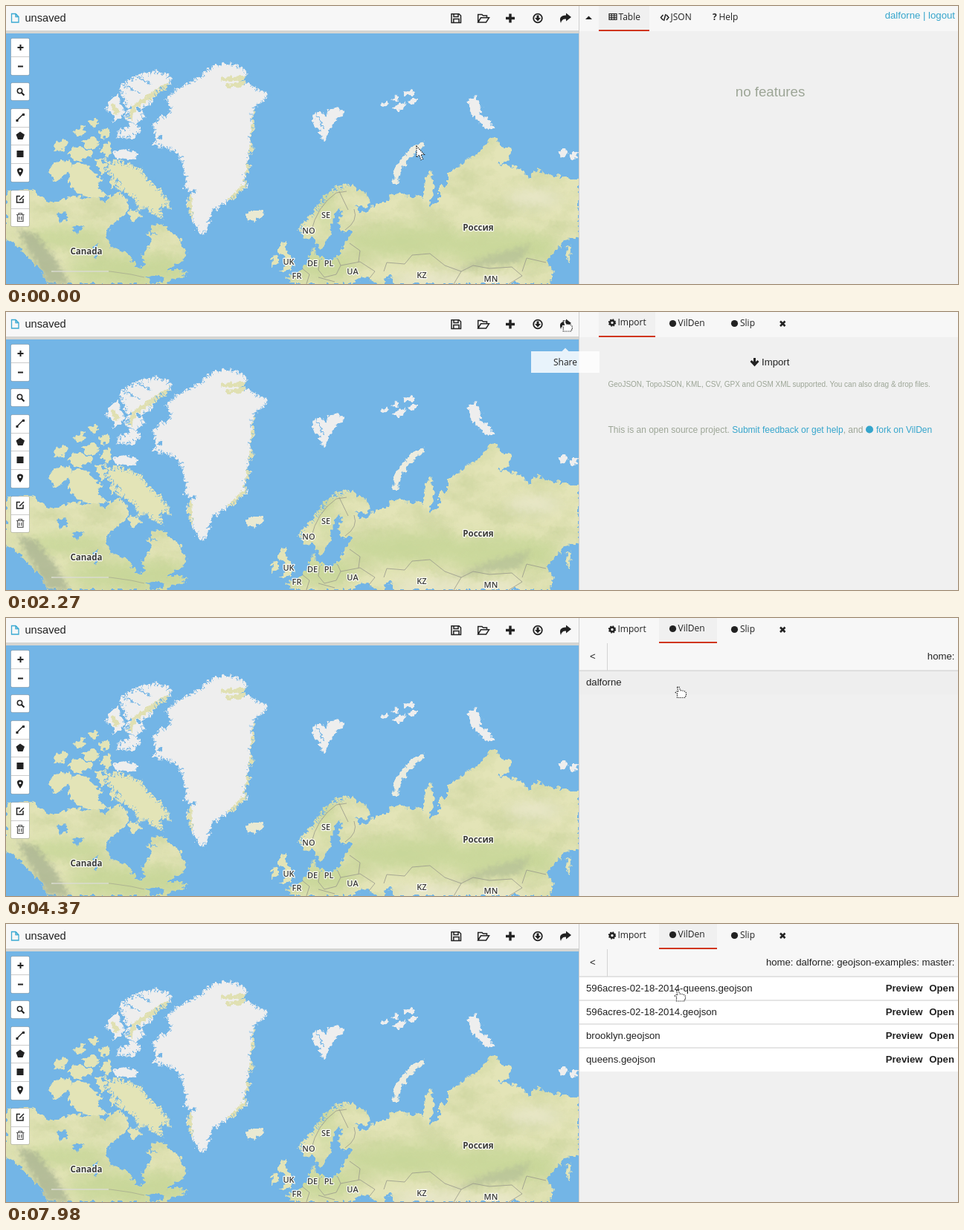
Animation, 1280 px wide and 375 px high, one loop 8000 ms. Source, as an HTML page:

```html
<!DOCTYPE html>
<html lang="en">
<head>
<meta charset="utf-8">
<title>Map editor</title>
<style>
html, body { margin: 0; width: 100%; height: 100%; overflow: hidden; background: #f0f0f0; }
svg { display: block; width: 100vw; height: 100vh; }
text { font: 13.2px "Liberation Sans", Arial, sans-serif; fill: #222; white-space: pre; }
.ui { font: 12px "Open Sans", "Noto Sans", sans-serif; }
.end { text-anchor: end; }
.mid { text-anchor: middle; }
.bold { font-weight: bold; }
.muted { fill: #9ca596; }
.link { fill: #35a5cc; }
.label { font: 600 11px "Open Sans", "Noto Sans", sans-serif; text-anchor: middle; fill: #3c3c38;
  stroke: #fffd; stroke-width: 2.5px; paint-order: stroke; stroke-linejoin: round; }
.big { font-size: 11.5px; font-weight: bold; }
.line { fill: none; stroke: #222; stroke-width: 1.5; }
.fjords { fill: none; stroke: #73b5e6; stroke-width: 9; stroke-dasharray: 1.3 5.2 1 3.6; }
.cursor path { fill: #fff; stroke: #222; stroke-width: 1.2; stroke-dasharray: 1.4 1.2; }
.tip path { fill: #fff; fill-opacity: .84; }
</style>
</head>
<body>
<svg viewBox="0 0 1280 375" preserveAspectRatio="none">
<defs>
  <filter id="coast" x="0" y="0" width="770" height="375" filterUnits="userSpaceOnUse" color-interpolation-filters="sRGB">
    <feTurbulence type="fractalNoise" baseFrequency=".17" numOctaves="2" seed="4"/>
    <feDisplacementMap in="SourceGraphic" scale="10" xChannelSelector="R" yChannelSelector="G"/>
  </filter>
  <filter id="relief" x="0" y="0" width="770" height="375" filterUnits="userSpaceOnUse" color-interpolation-filters="sRGB">
    <feTurbulence type="fractalNoise" baseFrequency=".02 .035" numOctaves="4" seed="9"/>
    <feColorMatrix values="0 0 0 0 .75  0 0 0 0 .8  0 0 0 0 .57  2 0 0 0 -.75"/>
  </filter>
  <filter id="soft" x="-30%" y="-30%" width="160%" height="160%"><feGaussianBlur stdDeviation="9"/></filter>
  <filter id="haze" x="-30%" y="-30%" width="160%" height="160%"><feGaussianBlur stdDeviation="3"/></filter>
  <clipPath id="map"><path d="M0 37H770V375H0Z"/></clipPath>
  <clipPath id="onLand"><use href="#america"/><use href="#eurasia"/></clipPath>
  <clipPath id="onIce"><use href="#greenland"/></clipPath>
  <path id="america" d="M-9 246L14 250 34 247 48 256 60 266 78 261 92 254 106 261 120 257 132 265 142 257 152 250 160 257 166 272 158 284 146 291 138 300 134 312 140 324 154 330 166 336 172 348 180 356 186 346 182 336 192 326 196 316 190 306 198 296 210 294 222 305 232 311 237 323 244 331 238 342 226 350 214 358 228 356 244 360 236 366 220 368 214 385H62L50 360 36 345 22 330 8 318-9 314Z"/>
  <path id="eurasia" d="M397 309L393 299 404 288 414 276 421 264 432 252 444 244 458 239 472 246 486 255 491 266 482 272 470 268 474 278 484 279 496 267 510 265 516 256 530 251 546 260 556 255 562 258 564 230 571 221 575 246 568 272 582 264 582 244 594 240 594 226 608 218 618 208 636 198 650 180 660 178 664 188 679 193 676 207 662 213 690 218 704 232 714 220 728 228 748 230 780 236V310L752 316 740 330 726 344 736 358 728 385H376L384 371 376 366 390 361 398 353 407 345 409 331 416 325 417 338 430 342 446 340 451 330 456 319 462 308 470 304 452 304 446 292 455 278 447 274 441 282 437 296 438 306 431 316 424 328 417 322 412 310 404 313Z"/>
  <path id="greenland" d="M197 160L206 150 216 146 222 134 214 126 230 110 246 103 262 94 276 82 296 76 318 82 327 92 318 100 340 112 353 118 346 130 336 134 331 150 335 165 328 180 334 192 324 206 330 216 320 232 326 243 308 258 290 268 279 278 273 292 269 308 259 305 250 290 245 276 242 262 251 250 239 246 242 232 236 216 233 200 214 192 196 186 204 178 198 170Z"/>
  <path id="ellesmere" d="M158 128L152 112 162 100 180 92 202 87 218 91 224 102 212 113 200 121 194 134 182 140 188 150 176 158 182 168 168 180 150 178 148 170 166 160 160 146 164 138Z"/>
  <path id="baffin" d="M134 212L150 208 166 212 182 220 192 234 206 246 218 262 221 276 208 271 212 288 198 282 188 272 178 278 174 262 160 252 148 248 152 236 138 226Z"/>
</defs>

<g clip-path="url(#map)">
  <path fill="#73b5e6" d="M0 37H770V375H0Z"/>
  <g filter="url(#coast)">
    <g fill="#e3e4b7">
      <use href="#america"/><use href="#eurasia"/><use href="#baffin"/>
      <path d="M57 224L66 210 82 208 90 214 80 228 66 238ZM84 220L98 211 112 215 118 226 130 234 122 244 137 256 118 260 98 254 86 242ZM120 208L136 205 140 222 128 228ZM140 228L148 226 150 244 142 248Z"/>
      <path d="M164 278L178 274 182 284 168 290ZM150 262L160 260 158 270ZM136 256L142 254 140 262Z"/>
      <path d="M64 188L76 178 84 184 78 194 68 196ZM90 170L104 163 108 171 98 175ZM82 200L92 190 104 192 118 198 108 205 96 208ZM102 182L118 176 126 186 116 194 106 190ZM112 156L122 152 124 160 116 164ZM126 192L138 184 143 198 134 204ZM124 168L138 166 140 176 128 178Z"/>
      <path d="M370 320L378 318 376 330 383 340 390 350 381 356 369 358 375 349 372 338 366 328ZM358 338L366 336 366 348 357 352ZM754 322L759 324 758 346 753 342Z"/>
      <path fill="#e9e9d2" d="M321 282L330 276 344 275 348 282 336 290 326 288Z"/>
    </g>
    <g clip-path="url(#onLand)">
      <rect width="770" height="375" filter="url(#relief)" opacity=".55"/>
      <g fill="#c6d697" filter="url(#soft)" opacity=".85">
        <ellipse cx="170" cy="355" rx="90" ry="22"/><ellipse cx="80" cy="312" rx="55" ry="14"/>
        <ellipse cx="540" cy="318" rx="85" ry="22"/><ellipse cx="665" cy="325" rx="80" ry="24"/>
        <ellipse cx="425" cy="350" rx="45" ry="20"/><ellipse cx="430" cy="275" rx="9" ry="30"/>
      </g>
      <g fill="#abb593" filter="url(#haze)">
        <path d="M14 300L40 308 66 340 86 375H56L36 340Z" opacity=".8"/>
        <path opacity=".5" d="M595 360L650 336 706 322 690 346 640 352Z"/>
      </g>
      <g fill="#e9e7cb" filter="url(#soft)"><ellipse cx="570" cy="372" rx="55" ry="12"/><ellipse cx="660" cy="374" rx="40" ry="10"/><ellipse cx="710" cy="260" rx="38" ry="10"/></g>
    </g>
    <path fill="#73b5e6" d="M68 280L80 277 84 287 74 290ZM88 300L106 295 104 300 92 306ZM116 326L122 322 124 338 118 340ZM188 366L206 362 214 370 198 374ZM468 370L486 366 496 376H464ZM508 366L518 364 522 376H510Z"/>
    <g fill="#eee">
      <use href="#greenland"/><use href="#ellesmere"/>
      <path d="M134 140L140 126 150 118 153 130 160 142 152 152 144 158 146 148ZM144 197L160 193 177 197 174 208 150 206Z"/>
      <path d="M412 147L424 143 430 150 436 139 452 138 454 146 444 152 440 160 434 166 428 186 423 172 414 160ZM621 128L632 122 640 134 636 146 646 150 657 164 648 168 634 156 626 146Z"/>
      <path d="M502 132L512 128 514 134 506 137ZM518 125L526 121 528 126 522 129ZM534 116L546 113 549 119 538 121ZM520 137L534 130 538 136 528 141ZM540 128L552 124 551 130 543 132ZM742 196L752 192 756 201 746 205ZM758 200L768 197 769 205 760 206Z"/>
      <path fill="none" stroke="#ececdf" stroke-width="8" d="M525 239Q522 224 534 210 544 194 561 186"/>
    </g>
    <g fill="none" stroke="#e0e0b2" stroke-width="6">
      <path d="M166 152L174 134 194 122 220 104M144 132L150 146"/>
      <g clip-path="url(#onIce)"><path d="M290 99L322 97 316 106 296 108M334 140L332 168 331 192 326 216 322 240 300 264M246 256L248 288"/></g>
    </g>
    <use class="fjords" href="#greenland" style="stroke-width:7"/><use class="fjords" href="#ellesmere"/><use class="fjords" href="#baffin"/>
    <path class="fjords" d="M398 306L396 296 414 276 432 252 458 239"/>
    <path fill="none" stroke="#73b5e6" stroke-width="1.5" d="M180 300L204 308M414 142L428 166M160 108L180 116M176 96L194 106"/>
  </g>
  <g fill="none" stroke="#99998c" stroke-width=".8">
    <path d="M410 305Q418 270 444 252L458 250M448 250L460 275M456 302Q474 290 468 274M446 341L450 350 444 362 428 366 420 356 422 342M398 354L408 362 404 375M450 350L476 345 496 358 488 368M462 320L476 330 474 345M420 366L442 372"/>
    <path d="M508 358L512 346 536 348 546 336 570 334 590 350 612 358 602 375M612 358L628 350 650 354 680 352 694 364 676 375M694 358L700 340 726 346"/>
    <path d="M64 358H140L168 362 186 366" opacity=".7"/>
  </g>
  <path fill="none" stroke="#eee" stroke-width="2" opacity=".5" d="M61 358H138"/>
  <g id="labels"></g>
</g>

<path fill="#f7f7f7" d="M0 0H770V33H0Z"/>
<path fill="#d5d5d2" d="M0 33H770V37H0Z"/>
<path class="line" style="stroke:#3aa9d2;stroke-width:1.3" d="M7.5 10.5H13L17 14.5V22H7.5ZM13 10.5V14.5H17"/>
<text x="25.5" y="21" style="font-size:14.6px">unsaved</text>
<g class="line">
  <path d="M599 10.7H609L611.5 13V22.5H599ZM602 11V14.5H608V11M601.8 22V17.5H609V22"/>
  <path d="M634.7 21.5V11.5H640L641.5 13H646.5V15.5M634.7 22L638.5 15.8H649.5L645.5 22Z"/>
  <path style="stroke-width:3.4" d="M672 16.5H684M678 10.5V22.5"/>
  <circle cx="715" cy="16.5" r="5.8" style="stroke-width:1.8"/>
</g>
<path fill="#222" d="M713.5 12.5H716.5V16H719L715 20.5 711 16H713.5ZM753 9.5L760 15 753 20.5V17.4Q747 17 746 23 742 13 753 12.6Z"/>

<g fill="#fff" stroke="#0003">
  <rect x="6.5" y="43.5" width="25" height="50" rx="2"/><rect x="6.5" y="103.5" width="25" height="24" rx="2"/>
  <rect x="6.5" y="138.5" width="25" height="99" rx="2"/><rect x="6.5" y="248.5" width="25" height="49" rx="2"/>
  <path stroke="#ccc" d="M7 68.5H31M7 163.5H31M7 187.5H31M7 212.5H31M7 273.5H31"/>
</g>
<g class="line">
  <path style="stroke-width:2" d="M15.5 56H23.5M19.5 52V60M16 81.5H23"/>
  <circle cx="18.5" cy="114.5" r="3.2"/><path style="stroke-width:2.2" d="M21 117L24.5 120.5"/>
  <path d="M15 154L23 146"/>
  <path d="M23 260V265H14.5V256.5H19M18 262L24 256"/>
  <path style="stroke:#555;stroke-width:1.2" d="M14 281.5H24.5M17 281V279.5H21.5V281M15.5 282V290.5H23V282M17.7 284V288.5M20.7 284V288.5"/>
</g>
<path fill="#222" d="M13.5 153H16.5V156H13.5ZM22 145H25V148H22ZM19 169.5L25 173.5 22.5 180H16L13.5 173.5ZM14.5 195H23.5V204H14.5Z"/>
<path fill="#222" fill-rule="evenodd" d="M19 230Q11 219 19 218.5 27 219 19 230ZM19 221A1.5 1.5 0 1 0 19 224 1.5 1.5 0 1 0 19 221Z"/>

<path fill="#f0f0f0" d="M770 0H1280V375H770Z"/>
<path fill="#f7f7f7" d="M770 0H1280V34H770Z"/>
<g id="panel"></g>
<path stroke="#cfcfcf" d="M770.5 0V375"/>

<g class="tip" id="openTip"><path d="M596 53H637L641.5 48.5 646 53H687.5V82H596Z"/><text class="ui mid" x="641.5" y="72">Open</text></g>
<g class="tip" id="shareTip"><path d="M706 53H747.5L752 48.5 756.5 53H798V82H706Z"/><text class="ui mid" x="752" y="72">Share</text></g>
<g id="hint"><rect x="919.5" y="20.5" width="234.5" height="22" rx="3" fill="#30342c" stroke="#000"/><text class="ui" x="923" y="36" style="font-size:13.3px;fill:#fff">GeoJSON files in VilDen Repositories</text></g>
<g class="cursor">
  <path id="arrow" d="M0 0V15L3.5 12 6 18.5 8.5 17.5 6 11.5H10.5Z"/>
  <path id="hand" d="M3 1.5L5.5 .8 7 5.5 12.5 6.5 15 9V13L13 14.5V15.5H3V10L.8 8.5 2.5 7 4.5 7.5Z"/>
</g>
</svg>
<script>
const $ = id => document.getElementById(id);
const user = 'dalforne', hub = 'VilDen', snippets = 'Slip';
const dark = '#222';

const text = (x, y, s, cls = '') => `<text x="${x}" y="${y}" class="${cls}">${s}</text>`;
const sized = (x, y, s, cls, size) => `<text x="${x}" y="${y}" class="${cls}" style="font-size:${size}px">${s}</text>`;
const box = (x, y, w, h, fill) => `<rect x="${x}" y="${y}" width="${w}" height="${h}" fill="${fill}"/>`;
const dot = (x, y, r, fill) => `<circle cx="${x}" cy="${y}" r="${r}" fill="${fill}"/>`;
const shape = d => `<path d="${d}" fill="${dark}"/>`;
const line = (d, width = 1.5) => `<path d="${d}" class="line" style="stroke-width:${width}"/>`;
const tabBack = (x, w) => box(x, 0, w, 34, '#f0f0f0') + box(x, 32, w, 2, '#d0351c');

$('labels').innerHTML = [['Canada', 108, 335, 'big'], ['Россия', 635, 303, 'big'], ['NO', 407, 307], ['SE', 430, 286],
  ['UK', 380, 349], ['DE', 412, 351], ['PL', 434, 351], ['FR', 391, 368], ['UA', 466, 362], ['KZ', 559, 367], ['MN', 652, 372]]
  .map(([s, x, y, size = '']) => text(x, y, s, 'label ' + size)).join('');

function tablePanel() {
  return tabBack(797, 68) + shape('M779 18L783.5 13.5 788 18Z') +
    line('M811 10.5H821V18.5H811ZM811 13H821M811 15.8H821M814.3 11V18M817.7 11V18', 1.2) +
    text(823.5, 18.5, 'Table', 'ui') +
    line('M883.5 12L880.5 15.5 883.5 19M888 12L891 15.5 888 19M887 11L884.5 20') +
    text(893.5, 19, 'JSON', 'ui') + text(950, 19, '?', 'ui bold') + text(958.5, 19, 'Help', 'ui') +
    text(1276, 17, `${user} | logout`, 'link end') +
    sized(1027.5, 122, 'no features', 'muted mid', 18.7);
}

function sourceTabs(importOn, hubOn) {
  const yi = importOn ? 14 : 15, yh = hubOn ? 14 : 15;
  return (importOn ? tabBack(797, 76) : '') + (hubOn ? tabBack(878, 78) : '') +
    `<g fill="none" stroke="${dark}"><circle cx="815" cy="${yi + .5}" r="3" stroke-width="2.6"/>` +
    `<circle cx="815" cy="${yi + .5}" r="4.5" stroke-width="1.4" stroke-dasharray="1.77"/></g>` +
    text(822.5, yi + 4, 'Import', 'ui') +
    dot(896.5, yh + .5, 4.6, dark) + text(903.5, yh + 4, hub, 'ui') +
    dot(979.5, 15.5, 4.6, dark) + text(987, 19, snippets, 'ui') +
    line('M1041 12.5L1047.5 19M1047.5 12.5L1041 19', 2.6);
}

function importPanel(hubHover) {
  return sourceTabs(true, hubHover) +
    shape('M1005 62H1008V67L1010.5 65 1012.5 67 1006.5 73.5 1000.5 67 1002.5 65 1005 67Z') +
    text(1016, 72, 'Import') +
    sized(809.5, 100.5, 'GeoJSON, TopoJSON, KML, CSV, GPX and OSM XML supported. You can also drag &amp; drop files.', 'muted', 10) +
    sized(809.5, 163, 'This is an open source project. <tspan class="link">Submit feedback or get help</tspan>, and', 'muted', 12) +
    dot(1161, 158.5, 5, '#35a5cc') + sized(1170, 163, `fork on ${hub}`, 'link', 12);
}

function listPanel(path, rows, shade, files) {
  const items = rows.map((name, i) => {
    const y = 71 + i * 32, base = y + 20;
    return box(771, y, 509, 32, i ? '#fff' : `rgb(${shade},${shade},${shade})`) +
      (i ? box(771, y - .5, 509, 1, '#ccc') : '') + text(780, base, name) +
      (files ? text(1232.5, base, 'Preview', 'bold end') + text(1275, base, 'Open', 'bold end') : '');
  });
  return sourceTabs(false, true) + box(771, 34, 509, 37, '#f7f7f7') + items.join('') +
    box(771, 70.5, 509, 1, '#ccc') + box(808, 34, 1, 37, '#d4d4d4') +
    text(785, 56, '&lt;') + text(1275.5, 56, path, 'end');
}

// Cursor stops: time, x, y
const stops = [[390, 552, 189], [960, 629, 30.5], [1130, 634, 14], [1389, 634, 14], [1390, 634, 13], [2170, 634, 13],
  [2270, 746, 10.5], [2760, 903, 7], [3980, 903, 7], [4370, 899.5, 92], [7939, 899.5, 92], [7940, 899, 97],
  [7979, 899, 97], [7980, 898.5, 88.5]];

const clamp = v => Math.min(1, Math.max(0, v));
const ramp = (t, a, b) => clamp((t - a) / (b - a));

function cursorAt(t) {
  const i = stops.findIndex(s => s[0] > t);
  if (i === 0) return stops[0].slice(1);
  if (i < 0) return stops.at(-1).slice(1);
  const [a, x, y] = stops[i - 1], [b, u, v] = stops[i];
  const k = ramp(t, a, b);
  return [x + (u - x) * k, y + (v - y) * k];
}

function panelAt(t, x) {
  if (t < 1730) return tablePanel();
  if (t < 3580) return importPanel(x > 876);
  const hover = (a, b) => Math.round(255 - 17 * ramp(t, a, b));
  const home = `home: ${user}: `;
  if (t < 5130) return listPanel('home:', [user], 238);
  if (t < 6200) return listPanel(home.trim(), ['geojson-examples', 'advanced-gis'], hover(5990, 6160));
  if (t < 7030) return listPanel(home + 'geojson-examples:', ['master'], hover(6860, 7000));
  return listPanel(home + 'geojson-examples: master:',
    ['596acres-02-18-2014-queens.geojson', '596acres-02-18-2014.geojson', 'brooklyn.geojson', 'queens.geojson'], 255, true);
}

const show = (id, opacity) => $(id).style.opacity = +opacity;
const start = performance.now();
let shown = '';

function frame() {
  const t = (performance.now() - start) % 8000;
  const [x, y] = cursorAt(t);
  const panel = panelAt(t, x);
  if (panel !== shown) $('panel').innerHTML = shown = panel;
  const onMap = x < 770 && y > 40;
  show('arrow', onMap);
  show('hand', !onMap);
  for (const id of ['arrow', 'hand']) $(id).setAttribute('transform', `translate(${x} ${y})`);
  show('openTip', t > 900 && t < 2210);
  show('shareTip', t > 2240 && t < 2400);
  show('hint', t < 3320 ? 0 : (.45 + .45 * ramp(t, 3320, 3480)) * (1 - ramp(t, 3560, 3725)));
  requestAnimationFrame(frame);
}
frame();
</script>
</body>
</html>
```
